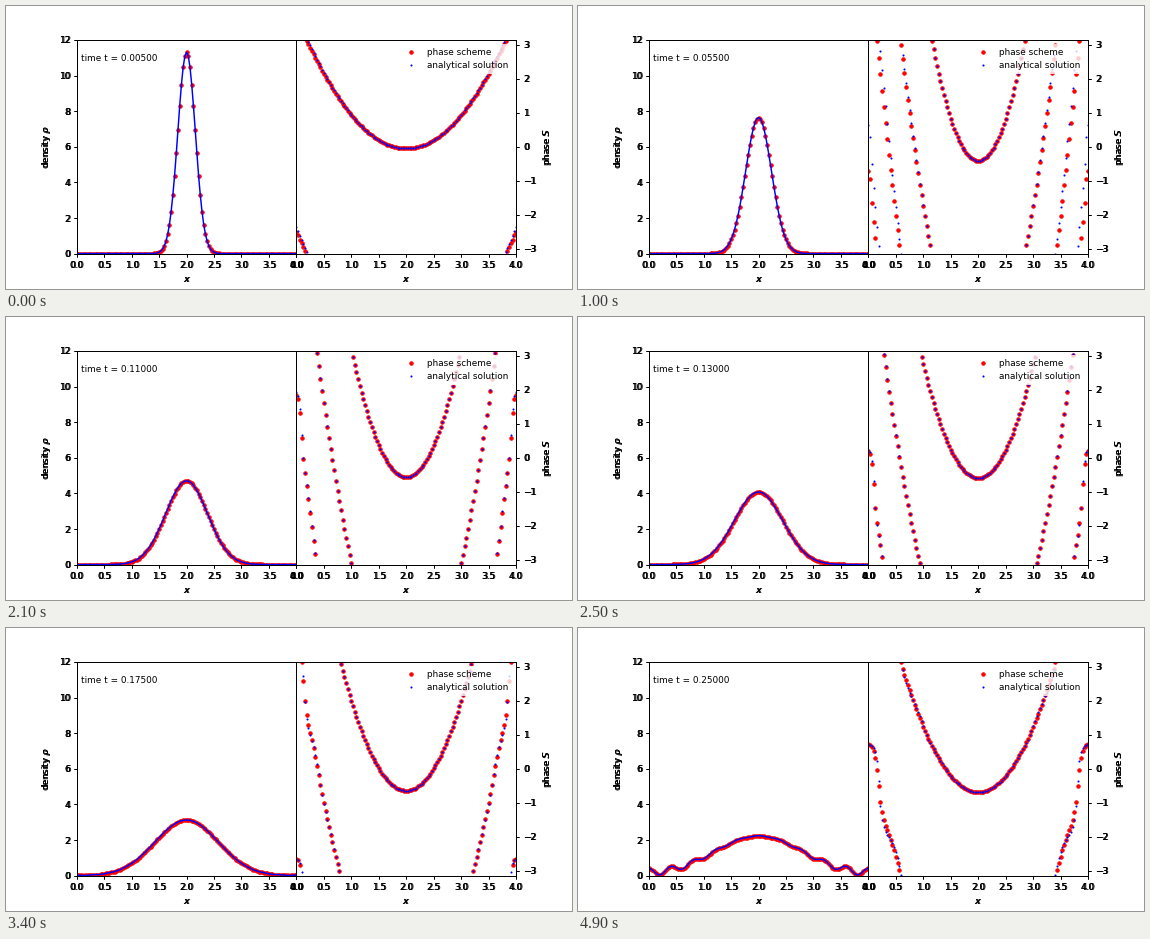
Recreate the animation shown at these times as a matplotlib script. Size 566 by 283 pixels, loop 5000 ms.

```python
import numpy as np
import matplotlib.pyplot as plt
from matplotlib.animation import FuncAnimation
from matplotlib.transforms import Affine2D

W, H, DPI = 566, 283, 70.75
FRAMES, INTERVAL, DT = 50, 100, 0.005
LENGTH, CELLS = 4.0, 128
WIDTH2 = 0.05                      # squared width of the initial packet
PEAK = 11.36
INK_SHIFTS = (0, 0, 1)             # labels are inked repeatedly, the last pass 1 px off

plt.rcParams.update({
    "font.family": "DejaVu Sans",
    "font.size": 9,
    "axes.linewidth": 0.8,
})

x = np.linspace(0, LENGTH, CELLS + 1)


def wave(t, damping=0.0):
    """Spreading Gaussian on a ring, as a sum of its periodic images."""
    c = t / WIDTH2
    psi = np.zeros_like(x, dtype=complex)
    for centre in LENGTH / 2 + LENGTH * np.arange(-2, 3):
        d2 = (x - centre) ** 2
        psi += np.exp(-d2 / (2 * WIDTH2 * (1 + 1j * c)) - damping * d2)
    return np.sqrt(PEAK / (1 + 1j * c)) * psi


def scheme_phase(t):
    """Numerical phase: weaker interference, and a lag where density vanishes."""
    c2 = (t / WIDTH2) ** 2
    depth = (x - LENGTH / 2) ** 2 / (WIDTH2 * (1 + c2))
    lag = 0.5 * (depth / 26) ** 3 * min(1, c2)
    return np.angle(wave(t, damping=0.3) * np.exp(-1j * lag))


fig = plt.figure(figsize=(W / DPI, H / DPI), dpi=DPI, facecolor="white")
LEFT, MIDDLE, RIGHT = 70.75 / W, 290.4 / W, 510 / W
BOTTOM, TOP = 0.125, 0.88


def panel(left, right, ylim, yticks, side):
    layers = []
    for shift in INK_SHIFTS:
        layer = fig.add_axes([left, BOTTOM, right - left, TOP - BOTTOM])
        layer.patch.set_visible(False)
        layer.set(xlim=(0, LENGTH), ylim=ylim,
                  xticks=np.arange(0, 4.1, 0.5), yticks=yticks)
        if side == "right":
            layer.yaxis.tick_right()
        for text in layer.get_xticklabels() + layer.get_yticklabels():
            text.set_transform(text.get_transform() + Affine2D().translate(shift, 0))
        layers.append(layer)
    return layers[0]


density = panel(LEFT, MIDDLE, (0, 12), range(0, 13, 2), "left")
phase = panel(MIDDLE, RIGHT, (-np.pi, np.pi), range(-3, 4), "right")


def label(px, py, text, rotation=0):
    for shift in INK_SHIFTS:
        dx, dy = (0, shift) if rotation else (shift, 0)
        fig.text((px + dx) / W, 1 - (py + dy) / H, text, rotation=rotation,
                 ha="center", va="center")


label(40.5, 141, r"density $\rho$", 90)
label(541, 141, "phase $S$", 90)
label(180.5, 273, "$x$")
label(399.5, 273, "$x$")

red_dots = dict(ls="", marker="o", color="red", ms=3.5, mew=1)
blue_dots = dict(ls="", marker="o", color="blue", ms=1.1, mew=1)

rho_scheme, = density.plot([], [], **red_dots)
rho_exact, = density.plot([], [], color="blue", lw=1.5)
s_scheme, = phase.plot([], [], label="phase scheme", **red_dots)
s_exact, = phase.plot([], [], label="analytical solution", **blue_dots)
clock = density.text(0.02, 0.9, "", transform=density.transAxes)
phase.legend(loc="upper right", numpoints=1, framealpha=0.8,
             edgecolor="none", facecolor="white")


def update(i):
    t = DT * (i + 1)
    exact = wave(t)
    rho = abs(exact) ** 2
    rho_scheme.set_data(x, rho)
    rho_exact.set_data(x, rho)
    s_scheme.set_data(x, scheme_phase(t))
    s_exact.set_data(x, np.angle(exact))
    clock.set_text(f"time t = {t:.5f}")
    return rho_scheme, rho_exact, s_scheme, s_exact, clock


anim = FuncAnimation(fig, update, frames=FRAMES, interval=INTERVAL,
                     repeat=True, repeat_delay=0, blit=False)
plt.show()
```
